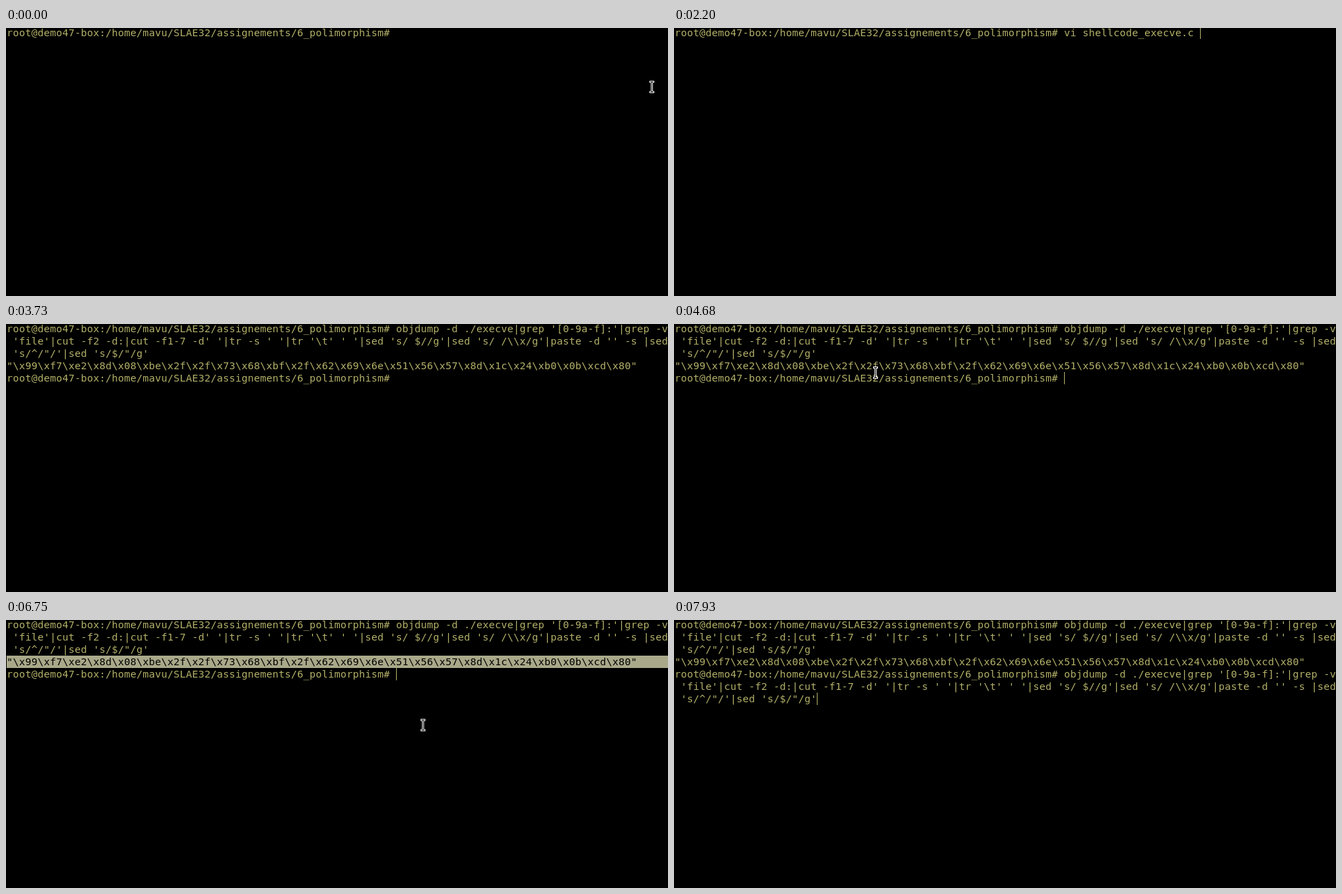
Animation of 964 by 391 pixels, one loop 8000 ms. Source, as an HTML page:

```html
<!DOCTYPE html>
<html lang="en">
<head>
<meta charset="utf-8">
<title>Terminal session</title>
<style>
  html, body { margin: 0; width: 100%; height: 100%; overflow: hidden; background: #000; }
  body { position: relative; }

  /* Character cells are 9 by 18 pixels; --row is the line a block starts on. */
  pre, #caret {
    position: absolute;
    left: 1px;
    top: calc(var(--row, 0) * 18px - 2px);
    margin: 0;
  }
  pre {
    width: 963px;
    font: 14.667px/18px "DejaVu Sans Mono", monospace;
    letter-spacing: calc(9px - 1ch);
    color: #b2b068;
    font-variant-ligatures: none;
  }
  .cmd { text-indent: 567px; }

  .part, #caret, #pointer, #output { animation: 8s step-end infinite; }
  .part, #caret { visibility: hidden; }

  #run { animation-name: run; }
  #build { animation-name: build; }
  #edit { animation-name: edit; }
  #dump { animation-name: dump; }
  .result { animation-name: result; }
  #again { animation-name: again; }
  #output { animation-name: result, select; }
  #caret { width: 1px; height: 18px; background: #b2b068; animation-name: caret; }
  #pointer { position: absolute; left: -4px; top: -9px; animation-name: pointer; }

  @keyframes run { 12.875% { visibility: visible } 20.25% { visibility: hidden } }
  @keyframes build { 20.25% { visibility: visible } 24.625% { visibility: hidden } }
  @keyframes edit { 24.625% { visibility: visible } 29.75% { visibility: hidden } }
  @keyframes dump { 29.75%, 100% { visibility: visible } }
  @keyframes result { 40%, 100% { visibility: visible } }
  @keyframes again { 98.125%, 100% { visibility: visible } }

  @keyframes select {
    69.375% { color: #000; background: #a9a98a }
    90% { color: #b2b068; background: transparent }
  }

  @keyframes caret {
    0% { visibility: hidden; transform: translate(567px, 0) }
    7.5% { visibility: visible; transform: translate(567px, 0) }
    12.875% { transform: translate(729px, 0) }
    20.25% { transform: translate(288px, 18px) }
    24.625% { transform: translate(765px, 0) }
    29.75% { visibility: visible; transform: translate(207px, 36px) }
    36.875% { visibility: hidden }
    39% { visibility: visible; transform: translate(0, 54px) }
    40% { transform: translate(567px, 72px) }
    46.625% { visibility: hidden }
    54.125% { visibility: visible }
    61.875% { visibility: hidden }
    69.375% { visibility: visible }
    76.875% { visibility: hidden }
    84.375% { visibility: visible }
    91.875% { visibility: hidden; transform: translate(567px, 72px) }
    98.125%, 100% { visibility: visible; transform: translate(207px, 108px) }
  }

  @keyframes pointer {
    0% { visibility: visible; transform: translate(940px, 86px) }
    .375% { transform: translate(940px, 86px); animation-timing-function: steps(4, start) }
    2.25% { transform: translate(951px, 79px); animation-timing-function: steps(4) }
    4.375% { transform: translate(938px, 68px) }
    12.875% { visibility: hidden; transform: translate(938px, 68px) }
    49.125% { visibility: visible; transform: translate(930px, 72px); animation-timing-function: steps(3) }
    51.25% { transform: translate(780px, 130px); animation-timing-function: steps(4) }
    53.75% { transform: translate(560px, 141px); animation-timing-function: steps(3) }
    56.25% { transform: translate(380px, 110px); animation-timing-function: steps(3) }
    58.5% { transform: translate(293px, 71px) }
    64.375% { transform: translate(293px, 71px); animation-timing-function: steps(2, start) }
    65.25% { transform: translate(293px, 64px) }
    76.875% { transform: translate(293px, 64px); animation-timing-function: steps(3) }
    80% { transform: translate(420px, 180px); animation-timing-function: steps(3) }
    82.5% { transform: translate(540px, 200px); animation-timing-function: steps(3) }
    85% { transform: translate(640px, 130px); animation-timing-function: steps(3) }
    87.5% { visibility: visible; transform: translate(663px, 87px) }
    98.125%, 100% { visibility: hidden; transform: translate(663px, 87px) }
  }
</style>
</head>
<body>
<pre>root@demo47-box:/home/mavu/SLAE32/assignements/6_polimorphism#</pre>

<pre class="cmd part" id="run">./shellcode_execve</pre>
<pre class="cmd part" id="build">gcc -fno-stack-protector -z execstack shellc
ode_execve.c -o shellcode_execve</pre>
<pre class="cmd part" id="edit">vi shellcode_execve.c</pre>
<pre class="cmd part" id="dump">objdump -d ./execve|grep '[0-9a-f]:'|grep -v
 'file'|cut -f2 -d:|cut -f1-7 -d' '|tr -s ' '|tr '\t' ' '|sed 's/ $//g'|sed 's/ /\\x/g'|paste -d '' -s |sed
 's/^/"/'|sed 's/$/"/g'</pre>

<pre class="part" id="output" style="--row:3">"\x99\xf7\xe2\x8d\x08\xbe\x2f\x2f\x73\x68\xbf\x2f\x62\x69\x6e\x51\x56\x57\x8d\x1c\x24\xb0\x0b\xcd\x80"</pre>
<pre class="part result" style="--row:4">root@demo47-box:/home/mavu/SLAE32/assignements/6_polimorphism#</pre>
<pre class="cmd part" id="again" style="--row:4">objdump -d ./execve|grep '[0-9a-f]:'|grep -v
 'file'|cut -f2 -d:|cut -f1-7 -d' '|tr -s ' '|tr '\t' ' '|sed 's/ $//g'|sed 's/ /\\x/g'|paste -d '' -s |sed
 's/^/"/'|sed 's/$/"/g'</pre>

<div id="caret"></div>
<svg id="pointer" width="9" height="18" shape-rendering="crispEdges" fill="none">
  <path d="M1 1.5H8M4.5 1V17M1 16.5H8" stroke="#fff" stroke-width="3"/>
  <path d="M2 1.5H7M4.5 1V17M2 16.5H7" stroke="#000"/>
</svg>
</body>
</html>
```
